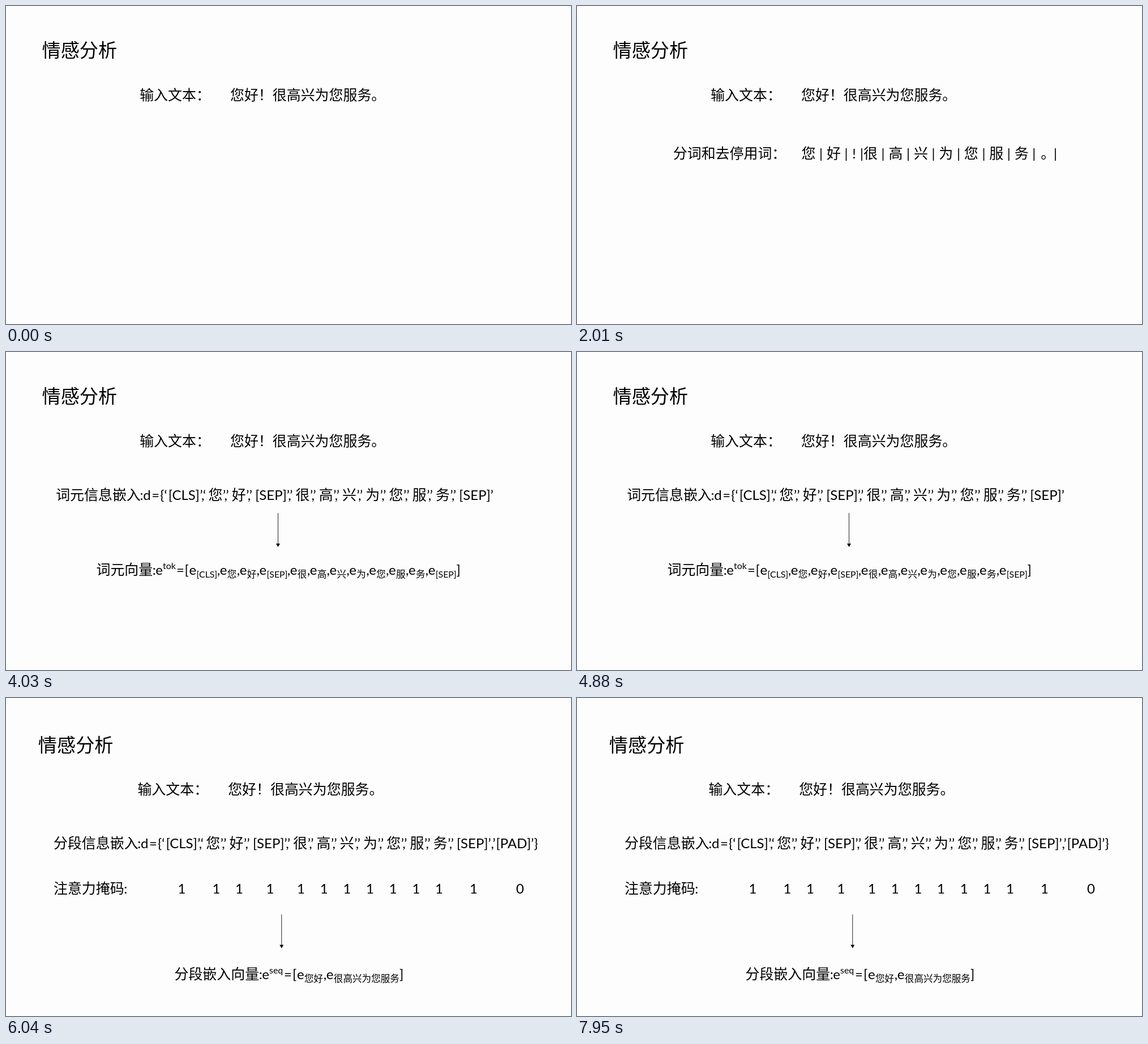
Write an HTML page that moves like this. It is 998 px wide and 561 px high and loops after 7.99 s.

```html
<!DOCTYPE html>
<html lang="zh-CN">
<head>
<meta charset="utf-8">
<title>情感分析</title>
<style>
  html, body { margin: 0; width: 100%; height: 100%; overflow: hidden; background: #fdfdfd; }
  svg { display: block; width: 998px; height: 561px; }
  text { fill: #000; font-family: Lato, "Open Sans", sans-serif; font-weight: 400; }
  .han { font-family: "Noto Sans CJK SC", "Noto Sans CJK", sans-serif; font-weight: 350; }
</style>
</head>
<body>
<svg id="stage" viewBox="0 0 998 561"></svg>
<script>
const NS = 'http://www.w3.org/2000/svg';
const LOOP = 7990;
const STARTS = [0, 2010, 4030, 6040];
const BODY = 24.95, SMALL = 16.6;

function add(parent, tag, attrs = {}, content = '') {
  const node = document.createElementNS(NS, tag);
  for (const key in attrs) node.setAttribute(key, attrs[key]);
  node.textContent = content;
  return parent.appendChild(node);
}

// Latin letters are set slightly smaller than the Chinese ones beside them.
function put(g, x, y, content, size = BODY, anchor = 'start') {
  const han = /[\u3000-\uffef]/.test(content);
  add(g, 'text', {
    x, y, class: han ? 'han' : 'latin', 'text-anchor': anchor,
    'font-size': han ? size : size * 0.962
  }, content);
}

const centred = (g, x, y, content) => put(g, x, y, content, BODY, 'middle');

function heading(g, x, y, lineX, lineY) {
  put(g, x, y, '情感分析', 33.2);
  put(g, lineX, lineY, '输入文本：');
  put(g, lineX + 159.8, lineY, '您好！很高兴为您服务。');
}

function arrow(g, x, top, bottom) {
  add(g, 'path', { d: `M${x} ${top}V${bottom - 5}`, stroke: '#222', 'stroke-width': 1 });
  add(g, 'path', { d: `M${x - 3.5} ${bottom - 6}h7l-3.5 6z`, fill: '#000' });
}

function segments(g) {
  const y = 268.5, step = 44.45;
  put(g, 169.8, y, '分词和去停用词：');
  const spread = (chars, x) => [...chars].forEach((c, i) => {
    put(g, x + i * step, y, c);
    centred(g, x + i * step + 34.6, y, '|');
  });
  spread('您好', 396.5);
  centred(g, 489.5, y, '!');
  centred(g, 503, y, '|');
  spread('很高兴为您服务', 506);
  put(g, 819.3, y, '。');
  centred(g, 845, y, '|');
}

// The quoted token list shared by both embedding slides.
function tokens(g, x, y, label) {
  const at = (dx, s) => put(g, x + dx, y, s);
  at(0, label);
  centred(g, x + 151.3, y, ':');
  at(154, 'd');
  at(169, '=');
  at(184, '{‘');
  at(198.5, '[CLS]');
  at(254.3, '’,‘');
  const quoted = (chars, dx) => [...chars].forEach((c, i) => {
    at(dx + i * 41.25, c);
    at(dx + i * 41.25 + 25.6, '’,’');
  });
  quoted('您好', 269.2);
  at(352, '[SEP]');
  at(407.6, '’,’');
  quoted('很高兴为您服务', 423.2);
  at(712, '[SEP]');
  at(767.6, '’');
}

function vectorHead(g, x, y, label, sup) {
  const width = label.length * BODY;
  put(g, x, y, label);
  centred(g, x + width + 2.5, y, ':');
  put(g, x + width + 5, y, 'e');
  put(g, x + width + 17.8, y - 9.5, sup, SMALL);
}

function element(g, x, y, sub, first) {
  if (!first) put(g, x - 5, y, ',');
  put(g, x, y, 'e');
  put(g, x + 13, y + 5, sub, SMALL);
}

function tokenVector(g) {
  const y = 392.5;
  vectorHead(g, 159.5, y, '词元向量', 'tok');
  put(g, 301, y, '=');
  put(g, 315.5, y, '[');
  let x = 323.5;
  ['[CLS]', ...'您好', '[SEP]', ...'很高兴为您服务', '[SEP]'].forEach((sub, i) => {
    element(g, x, y, sub, i === 0);
    x += sub.length > 1 ? 54.3 : 34.85;
  });
  put(g, 795.5, y, ']');
}

function segmentVector(g) {
  const y = 495.5;
  vectorHead(g, 297.5, y, '分段嵌入向量', 'seq');
  put(g, 491, y, '=');
  put(g, 506, y, '[');
  element(g, 514, y, '您好', true);
  element(g, 565.8, y, '很高兴为您服务');
  put(g, 695, y, ']');
}

function mask(g) {
  const y = 345.3;
  put(g, 84, y, '注意力掩码');
  centred(g, 211.3, y, ':');
  [310.5, 371.5, 412, 466.5, 521, 561.7, 602.4, 643, 683.8, 724.5, 765, 826]
    .forEach(x => centred(g, x, y, '1'));
  centred(g, 908, y, '0');
}

const slides = [
  g => heading(g, 63.5, 90, 236.2, 165.5),
  g => {
    heading(g, 63.5, 90, 236.2, 165.5);
    segments(g);
  },
  g => {
    heading(g, 63.5, 90, 236.2, 165.5);
    tokens(g, 88.2, 261, '词元信息嵌入');
    arrow(g, 480.5, 284, 344);
    tokenVector(g);
  },
  g => {
    heading(g, 56.8, 95, 232.4, 169.7);
    tokens(g, 84, 265.3, '分段信息嵌入');
    put(g, 856.5, 265.3, ',’');
    put(g, 865.5, 265.3, '[PAD]’}');
    mask(g);
    arrow(g, 486.8, 382, 441.5);
    segmentVector(g);
  }
];

const stage = document.getElementById('stage');
const groups = slides.map(draw => {
  const g = add(stage, 'g');
  draw(g);
  return g;
});

const begin = performance.now();
function render(now) {
  const time = Math.max(0, now - begin) % LOOP;
  const current = STARTS.filter(start => start <= time).length - 1;
  groups.forEach((g, i) => { g.style.display = i === current ? '' : 'none'; });
  requestAnimationFrame(render);
}
render(begin);
</script>
</body>
</html>
```
